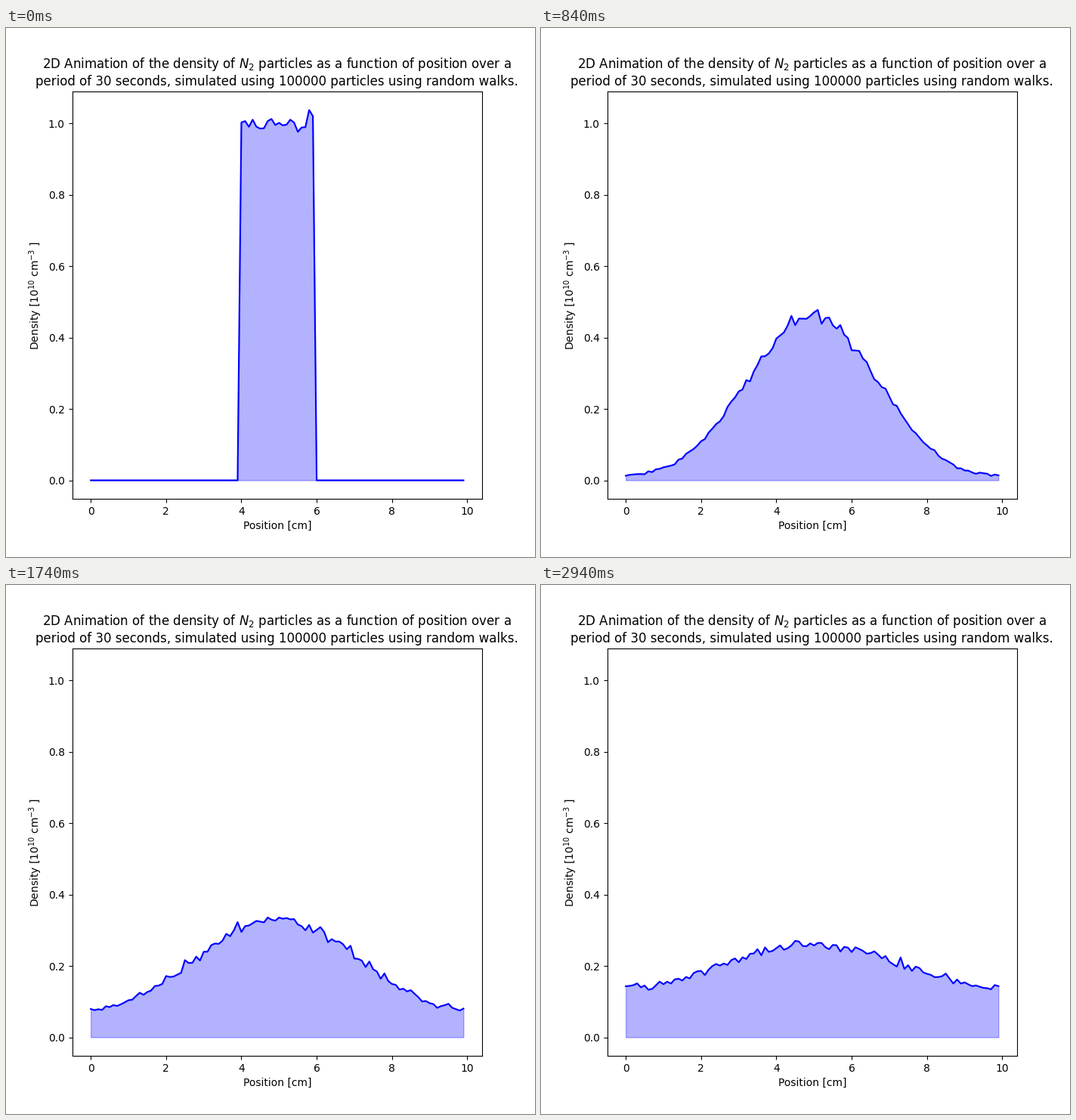
Recreate the animation shown at these times as a matplotlib script. Size 700 px wide and 700 px high, loop 3 s.

```python
import numpy as np
import matplotlib.pyplot as plt
from matplotlib.animation import FuncAnimation

FRAMES, INTERVAL = 50, 60
LENGTH, BIN = 10.0, 0.1
PER_UNIT = 5000        # particles in a bin at density 1
STEP_VAR = 0.19        # variance of the walk per frame, cm^2

# Density of the initial slab, one value per bin from 4 cm to 6 cm
SLAB = [1.003, 1.007, 0.991, 1.011, 0.991, 0.986, 0.987, 1.007, 1.013, 0.996,
        1.002, 0.995, 0.997, 1.011, 1.003, 0.977, 0.989, 0.990, 1.038, 1.021]


def density(pos):
    bins = np.clip((pos / BIN).astype(int), 0, 99)
    return np.bincount(bins, minlength=100) / PER_UNIT


def simulate(seed=4):
    """Random walks between two reflecting walls, one density row per frame."""
    rng = np.random.default_rng(seed)
    counts = np.rint(np.array(SLAB) * PER_UNIT).astype(int)
    left = np.repeat(4 + BIN * np.arange(len(SLAB)), counts)
    pos = left + BIN * rng.uniform(0.01, 0.99, left.size)
    rows = [density(pos)]
    for _ in range(FRAMES - 1):
        pos = np.abs(pos + rng.normal(0, np.sqrt(STEP_VAR), pos.size))
        pos = LENGTH - np.abs(LENGTH - pos)
        rows.append(density(pos))
    return rows


x = BIN * np.arange(100)
rows = simulate()

fig, ax = plt.subplots(figsize=(7, 7), dpi=100)
line, = ax.plot(x, rows[0], color="blue")
fill = ax.fill_between(x, rows[0], color="blue", alpha=0.3)

top, side = max(SLAB), x[-1]
ax.set_xlim(-0.05 * side, 1.05 * side)
ax.set_ylim(-0.05 * top, 1.05 * top)
ax.set_xlabel("Position [cm]")
ax.set_ylabel("Density [$10^{10}$ cm$^{-3}$ ]")
ax.set_title("2D Animation of the density of $N_2$ particles as a function of "
             "position over a\nperiod of 30 seconds, simulated using 100000 "
             "particles using random walks.")


def update(i):
    y = rows[i]
    line.set_ydata(y)
    outline = np.column_stack([x, y])
    fill.set_verts([np.vstack([[x[0], 0], outline, [x[-1], 0]])])
    return line, fill


anim = FuncAnimation(fig, update, frames=FRAMES, interval=INTERVAL,
                     repeat=True, repeat_delay=0)
plt.show()
```
